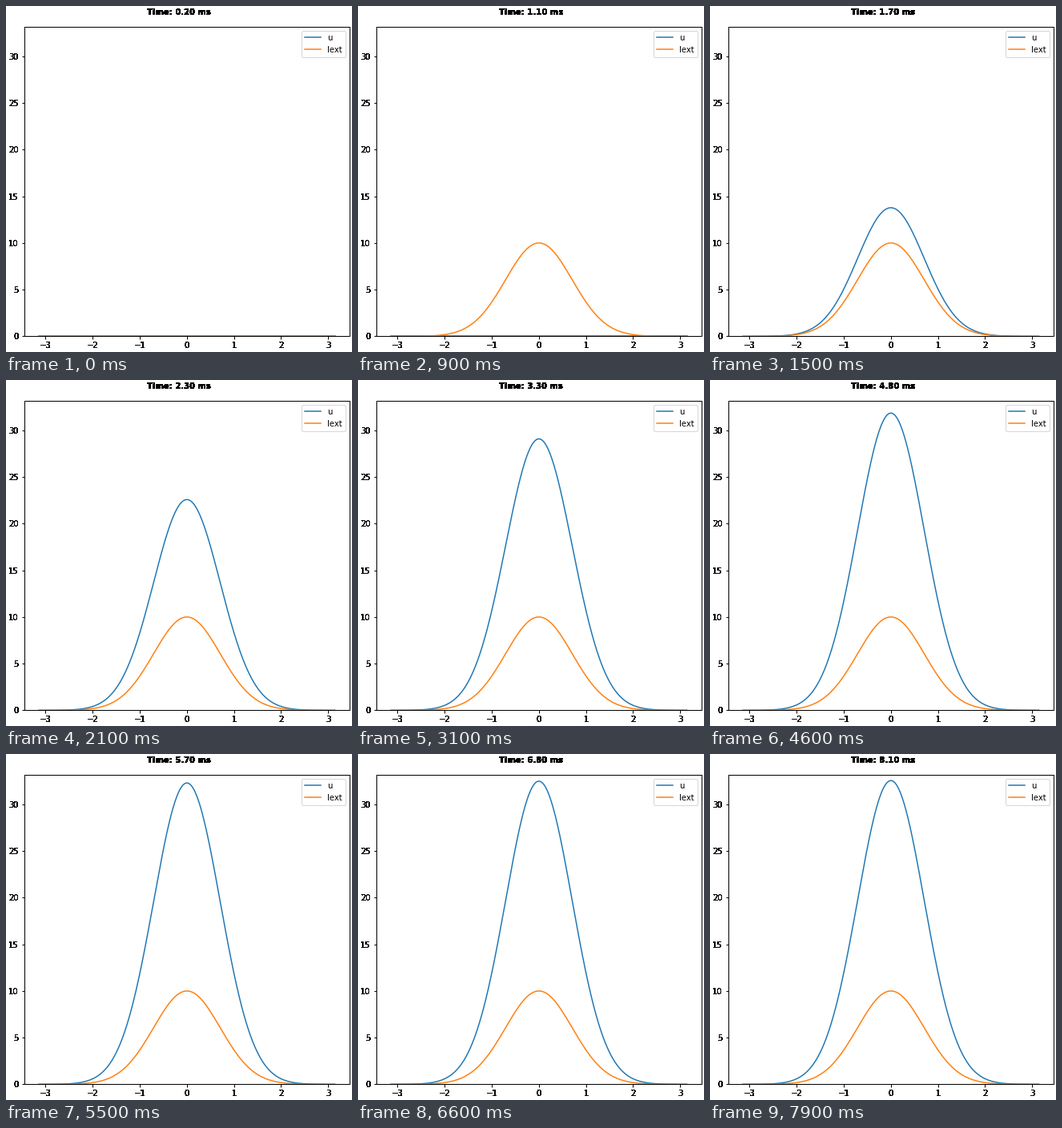
Recreate the animation shown at these times as a matplotlib script. Size 432 px wide and 432 px high, loop 8 s.

```python
import matplotlib.pyplot as plt
import numpy as np
from matplotlib.animation import FuncAnimation

SIZE, DPI = 432, 72
FRAMES, DELAY = 80, 100
DT = 0.1
ONSET = 9          # frame at which the stimulus switches on

plt.rcParams["font.family"] = "DejaVu Sans"

# Continuous attractor network on a ring
N, WIDTH, GAIN, INHIB, AMP = 512, 0.5, 4.0, 0.1, 10.0
x = np.linspace(-np.pi, np.pi, N)


def ring_dist(d):
    d = np.remainder(d, 2 * np.pi)
    return np.where(d > np.pi, d - 2 * np.pi, d)


weights = GAIN * np.exp(-0.5 * (ring_dist(x[:, None] - x) / WIDTH) ** 2)
weights /= np.sqrt(2 * np.pi) * WIDTH
stimulus = AMP * np.exp(-0.25 * (ring_dist(x) / WIDTH) ** 2)


def simulate():
    u = np.zeros(N)
    states, inputs = [], []
    for i in range(FRAMES):
        ext = stimulus if i >= ONSET else np.zeros(N)
        states.append(u)
        inputs.append(ext)
        sq = u ** 2
        rate = sq / (1 + INHIB * sq.sum())
        u = u + DT * (-u + weights @ rate + ext)
    return states, inputs


def harden(img, dpi):
    """Turn soft glyph edges into solid black pixels."""
    out = np.zeros_like(img)
    out[..., 3] = img[..., 3] > 0.1
    return out, 0, 0


states, inputs = simulate()

fig = plt.figure(figsize=(SIZE / DPI, SIZE / DPI), dpi=DPI, facecolor="white")
left, bottom, right, top = 22.7, 19.6, 429, 406.4
ax = fig.add_axes([left / SIZE, bottom / SIZE,
                   (right - left) / SIZE, (top - bottom) / SIZE])

u_line, = ax.plot(x, states[0], label="u")
ext_line, = ax.plot(x, inputs[0], label="Iext")
ax.set_xlim(-1.1 * np.pi, 1.1 * np.pi)
ax.set_ylim(0, states[-1].max() * 1.02)
ax.set_xticks(range(-3, 4))
ax.set_yticks(range(0, 31, 5))
ax.tick_params(width=1)
for spine in ax.spines.values():
    spine.set_linewidth(1)
ax.legend(loc="upper right")

title = fig.text(0.5, 1 - 3 / SIZE, "", ha="center", va="top",
                 fontsize=10, fontweight="bold")
for label in [title, *ax.get_xticklabels(), *ax.get_yticklabels()]:
    label.set_agg_filter(harden)


def update(i):
    u_line.set_ydata(states[i])
    ext_line.set_ydata(inputs[i])
    title.set_text(f"Time: {(i + 2) * DT:.2f} ms")
    return u_line, ext_line, title


anim = FuncAnimation(fig, update, frames=FRAMES, interval=DELAY,
                     repeat=True, repeat_delay=0, blit=False)
plt.show()
```
